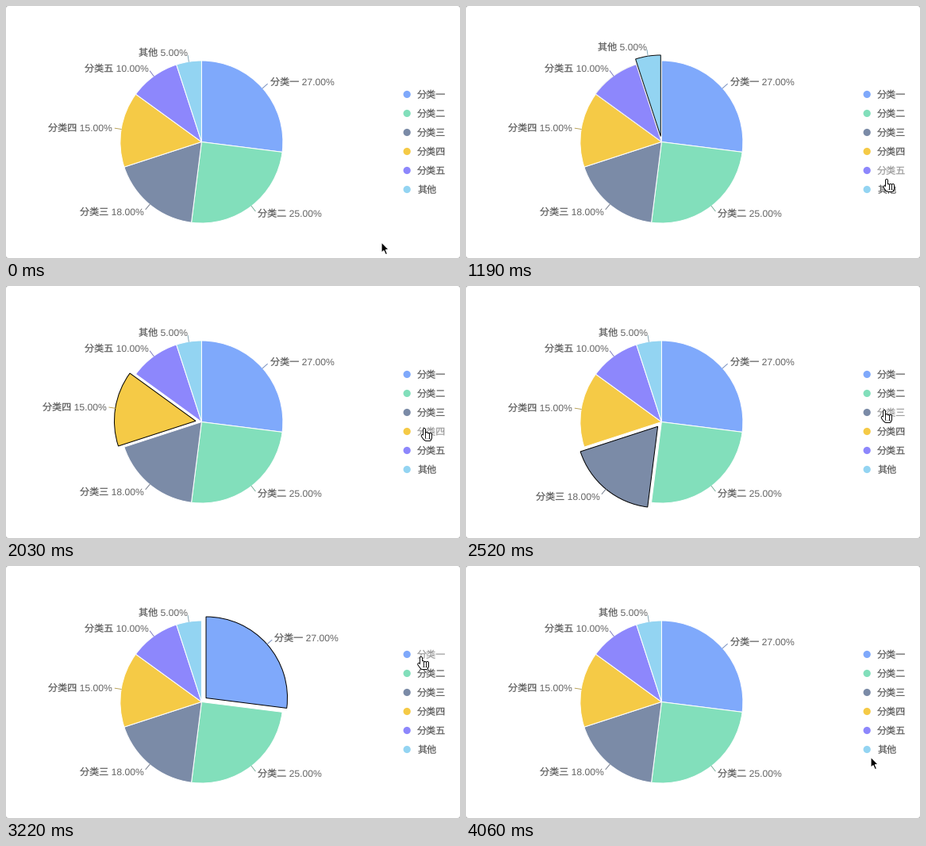
These frames come from a looping animation (572x318 px, 4.13 s). A matplotlib script:

```python
import matplotlib.pyplot as plt
import numpy as np
from matplotlib.animation import FuncAnimation
from matplotlib.colors import to_rgb
from matplotlib.patches import Circle, FancyBboxPatch, Polygon, Rectangle, Wedge
from matplotlib.transforms import Affine2D

W, H, DPI = 572, 318, 64
PX = 72 / DPI  # points per pixel
FRAMES, STEP = 59, 70

plt.rcParams["font.family"] = ["Liberation Sans", "Noto Sans CJK JP"]
plt.rcParams["text.hinting"] = "none"

SLICES = [
    ("分类一", 27, "#7fa9fb"),
    ("分类二", 25, "#82dfbb"),
    ("分类三", 18, "#7b8ba7"),
    ("分类四", 15, "#f5ca46"),
    ("分类五", 10, "#8d87fc"),
    ("其他", 5, "#93d4f2"),
]
CENTER = np.array([246.4, 171.5])
RADIUS, POP = 102.5, 7.5
ROW_TOP, ROW_STEP = 111.5, 24
TEXT, TEXT_HOVER = "#646464", "#a0a0a0"
RAMP = 2  # frames a slice needs to slide out or back

# Rests of the pointer: time in frames, x, y
STOPS = [(0, 473, 298), (4, 553, 243), (8, 553, 243), (11, 544, 235),
         (16, 531, 228), (22, 528, 205), (30, 527, 179), (36, 527, 156),
         (46, 522.5, 114), (52, 519, 191), (58, 510, 241)]


def pointer(t):
    """Position at time t, easing out towards each rest."""
    for (t0, *a), (t1, *b) in zip(STOPS, STOPS[1:]):
        if t <= t1:
            ease = 1 - (1 - (t - t0) / (t1 - t0)) ** 3
            return np.array(a) + (np.array(b) - a) * ease


def hovered(t):
    """Index of the legend row under the pointer, or None."""
    x, y = pointer(t)
    bottom = ROW_TOP + ROW_STEP * (len(SLICES) - 0.8)
    if x < 542 and y < bottom:
        return int((y - ROW_TOP) / ROW_STEP + 0.5)


def slide_levels(sub=10):
    """How far each slice is out, for every frame."""
    level, out = np.zeros(len(SLICES)), []
    for k in range(FRAMES * sub):
        if k % sub == 0:
            out.append(level)
        goal = np.arange(len(SLICES)) == hovered(min(k / sub, FRAMES - 1))
        level = np.clip(level + np.where(goal, 1, -1) / (RAMP * sub), 0, 1)
    return out


def mix(a, b, t):
    return tuple(np.array(to_rgb(a)) * (1 - t) + np.array(to_rgb(b)) * t)


fig = plt.figure(figsize=(W / DPI, H / DPI), dpi=DPI, facecolor="#b4b4b4")
ax = fig.add_axes([0, 0, 1, 1])
ax.set_xlim(0, W)
ax.set_ylim(H, 0)
ax.axis("off")
ax.add_patch(Rectangle((0, 0), W, H, fc="#b4b4b4", lw=0, zorder=0))
ax.add_patch(FancyBboxPatch((0, 0), W, H, fc="white", lw=0, zorder=0.5,
                            boxstyle="round,pad=0,rounding_size=3.5"))


def label(x, y, text, ha="left"):
    return ax.text(x, y, text, size=12.1 * PX, color=TEXT, ha=ha,
                   va="baseline", zorder=4)


class Slice:
    def __init__(self, row, name, share, start, color):
        a0, a1 = (3.6 * v - 90 for v in (start, start + share))
        mid = np.radians((a0 + a1) / 2)
        self.dir = np.array([np.cos(mid), np.sin(mid)])
        self.wedge = ax.add_patch(Wedge(CENTER, RADIUS, a0, a1, fc=color,
                                        lw=PX, joinstyle="miter"))
        self.tick, = ax.plot([], [], color=mix(color, "#555555", 0.4),
                             lw=0.9 * PX, zorder=3)
        self.label = label(0, 0, f"{name} {share:.2f}%",
                           "left" if self.dir[0] > 0 else "right")
        y = ROW_TOP + ROW_STEP * row
        ax.add_patch(Circle((505.2, y), 4.6, fc=color, lw=0, zorder=3))
        self.item = label(518.4, y + 4.2, name)

    def pose(self, level, active):
        c = CENTER + self.dir * POP * level
        self.wedge.set_center(tuple(c))
        self.wedge.set_edgecolor(mix("white", "black", level))
        self.wedge.set_zorder(2 + level / 2)
        ends = np.array([c + self.dir * r for r in (RADIUS, RADIUS + 8)])
        self.tick.set_data(ends[:, 0], ends[:, 1])
        self.label.set_position(c + self.dir * (RADIUS + 12) + (0.5, 4.2))
        self.item.set_color(TEXT_HOVER if active else TEXT)


def make_hand():
    """Capsules for fingers, thumb and palm: black, then smaller in white."""
    strokes = [([2.7 * k] * 2, [2 if k == 0 else 6.8 + 0.4 * k, 13])
               for k in range(4)]
    strokes += [([-2.3, 0.6], [10, 14]), ([1.8, 7], [14.7, 14.7])]
    parts = []
    for color, width in (("black", 4), ("white", 2.1)):
        for xs, ys in strokes:
            parts += ax.plot(xs, ys, color=color, lw=width * PX, zorder=9,
                             solid_capstyle="round")
    return parts


slices, total = [], 0
for row, (name, share, color) in enumerate(SLICES):
    slices.append(Slice(row, name, share, total, color))
    total += share

arrow = ax.add_patch(Polygon(
    [(0, 0), (0, 13.5), (3, 10.7), (5.3, 15.8), (7.6, 14.8), (5.4, 9.7),
     (9.5, 9.7)], fc="black", ec="white", lw=1.2 * PX, zorder=9))
hand = make_hand()
levels = slide_levels()


def update(n):
    active = hovered(n)
    for i, s in enumerate(slices):
        s.pose(levels[n][i], i == active)
    place = Affine2D().translate(*pointer(n)) + ax.transData
    for part in [arrow, *hand]:
        part.set_transform(place)
        part.set_visible((part is arrow) == (active is None))
    return []


anim = FuncAnimation(fig, update, frames=FRAMES, interval=STEP, repeat=True,
                     repeat_delay=0, init_func=lambda: update(0))
plt.show()
```
